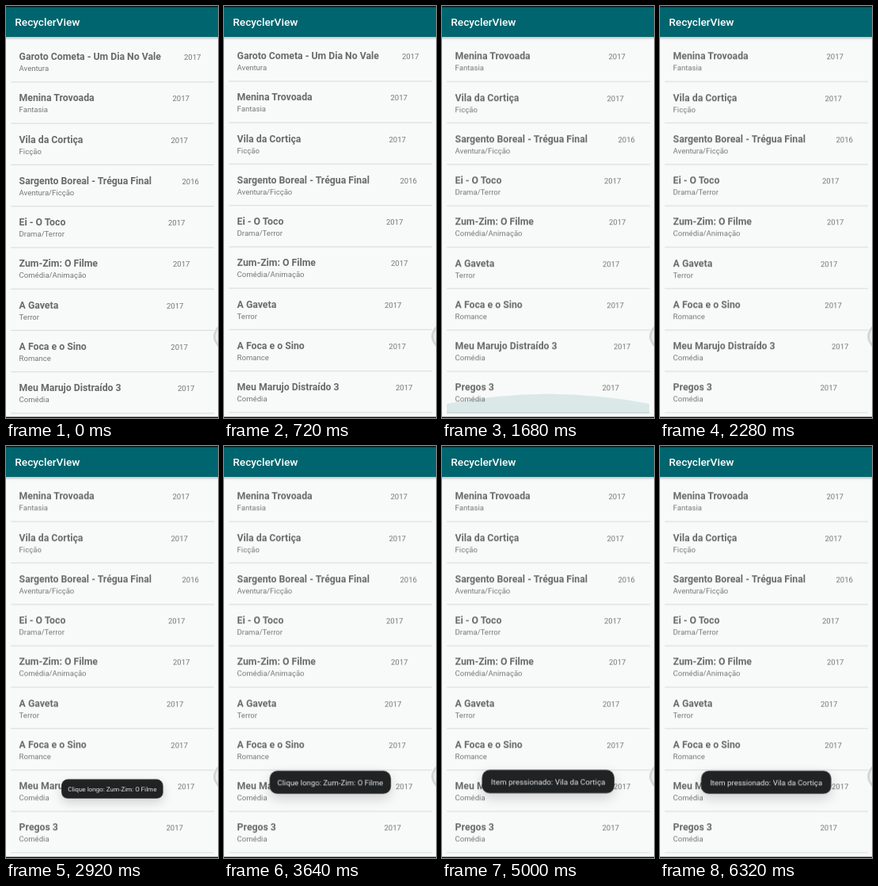
Write an HTML page that moves like this. It is 268 by 520 pixels and loops after 6360 ms.

```html
<!DOCTYPE html>
<html lang="pt">
<head>
<meta charset="utf-8">
<title>RecyclerView</title>
<style>
  html, body { margin: 0; width: 100%; height: 100%; overflow: hidden; background: #f8faf9; }
  svg { display: block; width: 268px; height: 520px; font: 9.56px Roboto, sans-serif; }
  .bar { font-size: 13.65px; font-weight: 500; fill: #fff; }
  .title { font-size: 12.28px; font-weight: 700; fill: #686a69; }
  .sub { fill: #747675; }
  .toast { transform-origin: 134px 476px; opacity: 0; filter: drop-shadow(0 6px 8px rgba(0, 0, 0, .16)); }
  .toast rect { fill: #202323; }
  .toast text { font-size: 9.65px; fill: #e6e8e7; text-anchor: middle; }
  #glow { transform-origin: 134px 514.5px; opacity: 0; }
</style>
</head>
<body>
<svg id="stage" viewBox="0 0 268 520">
  <defs>
    <clipPath id="area"><rect x="6" y="44" width="257" height="470.8"/></clipPath>
    <linearGradient id="shade" x2="0" y2="1">
      <stop stop-color="#000" stop-opacity=".22"/>
      <stop offset="1" stop-color="#000" stop-opacity="0"/>
    </linearGradient>
  </defs>
  <rect width="268" height="520" fill="#f8faf9"/>
  <g clip-path="url(#area)">
    <g id="list"></g>
    <path id="glow" fill="#006670" d="M6 514.5V500Q134 471 262 500V514.5Z"/>
  </g>
  <rect y="39" width="268" height="4" fill="url(#shade)"/>
  <rect width="268" height="39" fill="#00656e"/>
  <rect width="268" height="1.4" fill="#061314"/>
  <text class="bar" x="11.3" y="24.8">RecyclerView</text>
  <path d="M269 405Q258 417 269 429" fill="#eef0ef" stroke="#d3d6d5" stroke-width="2.8"/>
  <rect y="518.6" width="268" height="1.4" fill="#0b0d0d"/>
</svg>
<script>
const LOOP = 6360, PITCH = 52.25;
const stage = document.getElementById('stage');
const list = document.getElementById('list');

const movies = [
  ['Garoto Cometa - Um Dia No Vale', 'Aventura', 2017, 225],
  ['Menina Trovoada', 'Fantasia', 2017, 210.5],
  ['Vila da Cortiça', 'Ficção', 2017, 208.5],
  ['Sargento Boreal - Trégua Final', 'Aventura/Ficção', 2016, 222.5],
  ['Ei - O Toco', 'Drama/Terror', 2017, 205],
  ['Zum-Zim: O Filme', 'Comédia/Animação', 2017, 211],
  ['A Gaveta', 'Terror', 2017, 203],
  ['A Foca e o Sino', 'Romance', 2017, 208.3],
  ['Meu Marujo Distraído 3', 'Comédia', 2017, 217],
  ['Pregos 3', 'Comédia', 2017, 202.5]
];

function add(parent, tag, attrs, text = '') {
  const el = document.createElementNS('http://www.w3.org/2000/svg', tag);
  for (const key in attrs) el.setAttribute(key, attrs[key]);
  el.textContent = text;
  return parent.appendChild(el);
}

movies.forEach(([title, genre, year, yearX], i) => {
  const y = 43.7 + i * PITCH;
  add(list, 'text', { class: 'title', x: 16.6, y: y + 24.5 }, title);
  add(list, 'text', { class: 'sub', x: 16.6, y: y + 38.3 }, genre);
  add(list, 'text', { class: 'sub', x: yearX, y: y + 24.3 }, year);
  add(list, 'rect', { x: 6, y: y + PITCH - 0.6, width: 257, height: 1.2, fill: '#dcdfde' });
});

function makeToast(text, x, width) {
  const g = add(stage, 'g', { class: 'toast' });
  add(g, 'rect', { x, y: 410, width, height: 29, rx: 9.5 });
  add(g, 'text', { x: x + width / 2, y: 427.9 }, text);
  return g;
}

// Each step: [time in ms, style, easing to the next step]
function play(el, steps) {
  const last = steps[steps.length - 1];
  const frames = [[0, steps[0][1]], ...steps, [LOOP, last[1]]].map(
    ([time, style, easing = 'linear']) => ({ offset: time / LOOP, easing, ...style }));
  el.animate(frames, { duration: LOOP, iterations: Infinity }).startTime = 0 + start;
}

// Pop in with a small overshoot, then fade at the end
function popToast(el, from, until) {
  const pose = (scale, opacity) => ({ transform: `scale(${scale})`, opacity });
  const steps = [
    [from, pose(0.7, 0)],
    [from + 80, pose(0.775, 0.9)],
    [from + 120, pose(0.837, 1)],
    [from + 240, pose(1.018, 1), 'ease-in-out'],
    [from + 460, pose(1, 1)]
  ];
  if (until) steps.push([until, pose(1, 1)], [until + 140, pose(0.94, 0)]);
  play(el, steps);
}

const start = document.timeline.currentTime || 0;
const shift = y => ({ transform: `translateY(${y}px)` });
const glow = (scale, opacity) => ({ transform: `scaleY(${scale})`, opacity });

play(list, [[700, shift(0), 'ease-in-out'], [920, shift(-52.8)]]);

play(document.getElementById('glow'), [
  [880, glow(0, 0), 'ease-out'],
  [1000, glow(1, 0.13)],
  [1680, glow(0.86, 0.12), 'ease-out'],
  [2080, glow(0, 0)]
]);

popToast(makeToast('Clique longo: ' + movies[5][0], 57.7, 153.3), 2800, 4600);
popToast(makeToast('Item pressionado: ' + movies[2][0], 52, 164.4), 4760);
</script>
</body>
</html>
```
